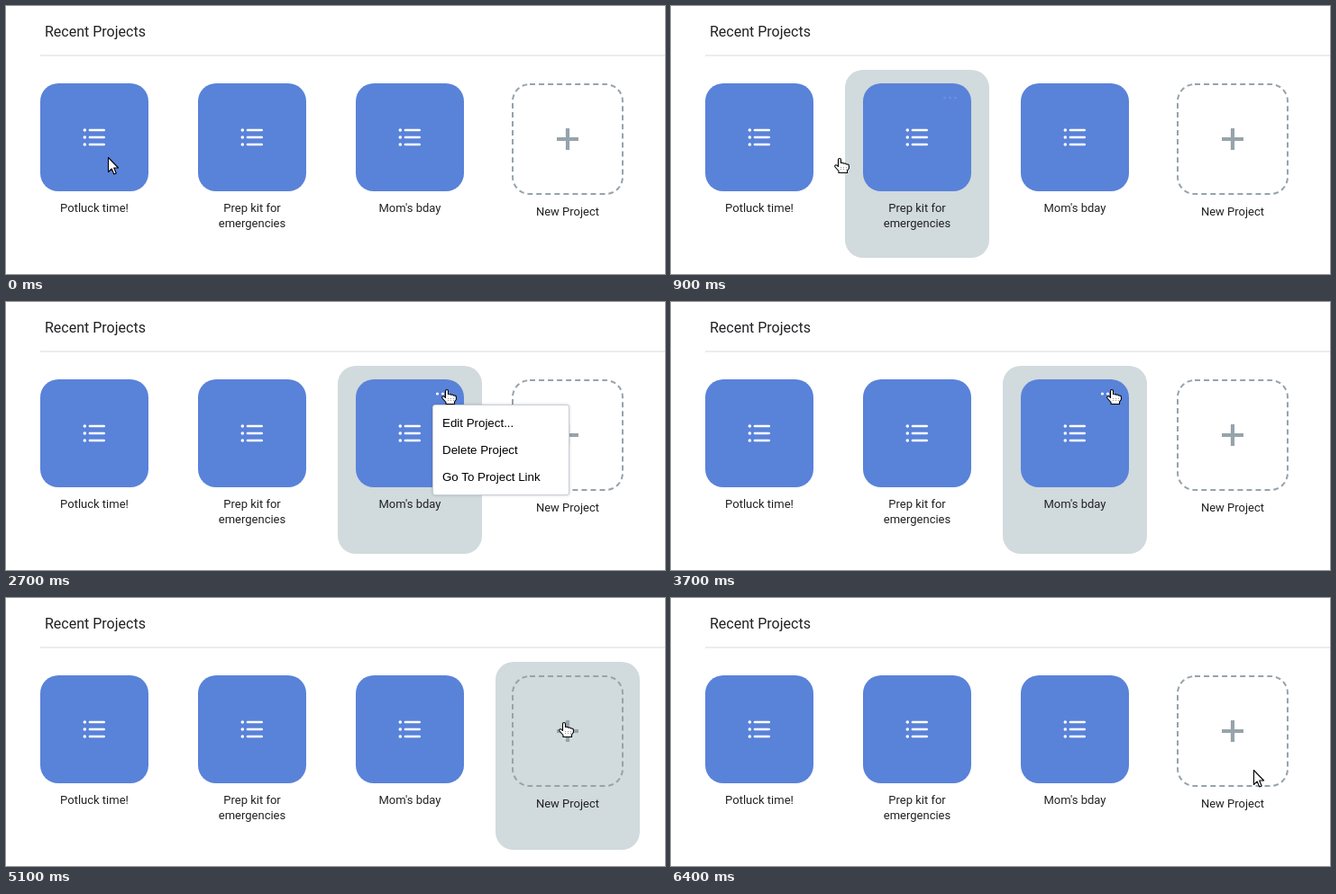
Animation, 731 px wide and 298 px high, one loop 6.5 s. Source, as an HTML page:

```html
<!DOCTYPE html>
<html lang="en">
<head>
<meta charset="utf-8">
<title>Recent Projects</title>
<style>
  html, body { margin: 0; width: 100%; height: 100%; overflow: hidden; background: #fff; }
  body { position: relative; font: 13px/17px Roboto, sans-serif; color: #202124; }
  div, svg { position: absolute; box-sizing: border-box; }
  #title { left: 43px; top: 19px; font-size: 16px; line-height: 19px; white-space: nowrap; }
  #rule { left: 38px; right: 0; top: 54px; height: 2px; background: #ebedee; }
  .card { top: 71px; width: 160px; height: 209px; border-radius: 20px; }
  .card.hover { background: #d1dadc; }
  .tile { left: 20px; top: 15px; width: 120px; height: 120px; border-radius: 20px; overflow: hidden; background: #5982d9; }
  .new .tile { left: 18px; width: 124px; height: 124px; background: none; }
  .tile svg { left: 0; top: 0; width: 100%; height: 100%; fill: #fff; }
  .new rect { fill: none; stroke: #96a3ab; stroke-width: 4; stroke-dasharray: 6 4.04; }
  .new path { stroke: #96a3ab; stroke-width: 4.2; }
  .label { left: 20px; top: 145px; width: 120px; text-align: center; }
  .new .label { top: 149px; }
  #menu {
    left: 473px; top: 114px; width: 152px; height: 101px; padding: 5px 10px;
    background: #fff; border: 1px solid #c9ced6; border-radius: 3px;
    box-shadow: 0 0 3px rgba(60, 70, 90, .3);
    font: 13.333px/29px "Liberation Sans", Arial, sans-serif; color: #000; white-space: nowrap;
  }
  #menu p { margin: 0 0 1px; }
  #cursor { left: 0; top: 0; overflow: visible; }
  #cursor path { fill: #fff; stroke: #000; stroke-width: 1.1; stroke-linejoin: round; }
  #cursor .creases { stroke: #999; stroke-dasharray: 1 1; }
</style>
</head>
<body>
<div id="title">Recent Projects</div>
<div id="rule"></div>
<div id="menu"><p>Edit Project...</p><p>Delete Project</p><p>Go To Project Link</p></div>
<svg id="cursor" width="20" height="22">
  <path id="arrow" d="M.5 .5V16.5L4.2 13 6.8 19 9.2 18 6.7 12H11.6Z"/>
  <g id="hand" transform="translate(-5 0)">
    <path d="M4.5 9.5V2Q4.5 .5 6 .5T7.5 2V5.5Q10 4.7 10.5 6.2 13 5.6 13.5 7 16.3 6.6 16.4 9V11.5L14.5 14V16.5H5V14.5L1 10Q.2 8.2 1.8 7.7 3.1 7.5 4.5 9.5Z"/>
    <path class="creases" d="M7.5 10V13M10.5 10V13M13.5 10V13"/>
  </g>
</svg>
<script>
const LOOP = 6500, STEP = 100, PITCH = 175;
const labels = ['Potluck time!', 'Prep kit for<br>emergencies', "Mom's bday", 'New Project'];
const $ = id => document.getElementById(id);
const show = (el, on) => { el.style.visibility = on ? 'visible' : 'hidden'; };
const clamp = v => Math.min(1, Math.max(0, v));

const three = make => [-1, 0, 1].map(make).join('');
const listIcon = three(k =>
  `<circle cx="49.3" cy="${60 + 8 * k}" r="1.8"/><rect x="53.6" y="${58.7 + 8 * k}" width="18.4" height="2.6" rx="1.3"/>`);
const moreIcon = `<g class="more">${three(k => `<circle cx="${96.5 + 6 * k}" cy="16" r="1.6"/>`)}</g>`;
const newIcon = '<rect width="124" height="124" rx="20"/><path d="M50 62H74M62 50V74"/>';

const cards = labels.map((label, i) => {
  const card = document.createElement('div');
  const isNew = i === labels.length - 1;
  card.className = isNew ? 'card new' : 'card';
  card.style.left = 18 + PITCH * i + 'px';
  card.innerHTML =
    `<div class="tile"><svg>${isNew ? newIcon : listIcon + moreIcon}</svg></div><div class="label">${label}</div>`;
  document.body.insertBefore(card, $('menu'));
  return card;
});

// Pointer moves: when each begins and ends, and where the tip arrives
const home = { x: 113, y: 168 };
const moves = [
  { from: 800, to: 900, x: 186, y: 169 },
  { from: 900, to: 1200, x: 282, y: 174 },
  { from: 1300, to: 1500, x: 376, y: 172 },
  { from: 1500, to: 2000, x: 453, y: 172 },
  { from: 2000, to: 2400, x: 488, y: 97 },
  { from: 4000, to: 4200, x: 556, y: 137 },
  { from: 4300, to: 4500, x: 618, y: 138 },
  { from: 5200, to: 5400, x: 646, y: 191 }
];

function pointerAt(t) {
  let { x, y } = home;
  for (const m of moves) {
    const k = clamp((t - m.from) / (m.to - m.from));
    x += (m.x - x) * k;
    y += (m.y - y) * k;
  }
  return { x: Math.round(x), y: Math.round(y) };
}

const cardAt = t => t >= 100 && t < 6400 ? Math.floor((pointerAt(t).x - 10.5) / PITCH) : -1;

// The three dots fade in over the first steps of a hover
function fadeAt(t) {
  let age = 0;
  while (age < 2 && cardAt(t - STEP * (age + 1)) === cardAt(t)) age++;
  const k = (age + .5) / 2.5;
  return k * k * (3 - 2 * k);
}

function draw() {
  // The picture advances in ten steps per second
  const t = Math.floor((performance.now() - start) % LOOP / STEP) * STEP;
  const { x, y } = pointerAt(t);
  const current = cardAt(t);

  cards.forEach((card, i) => {
    card.classList.toggle('hover', i === current);
    const more = card.querySelector('.more');
    if (more) more.style.opacity = i === current ? fadeAt(t) : 0;
  });
  show($('menu'), t >= 2700 && t < 3700);
  show($('hand'), current >= 0);
  show($('arrow'), current < 0);
  $('cursor').style.transform = `translate(${x}px, ${y}px)`;
  requestAnimationFrame(draw);
}

const start = performance.now();
draw();
</script>
</body>
</html>
```
